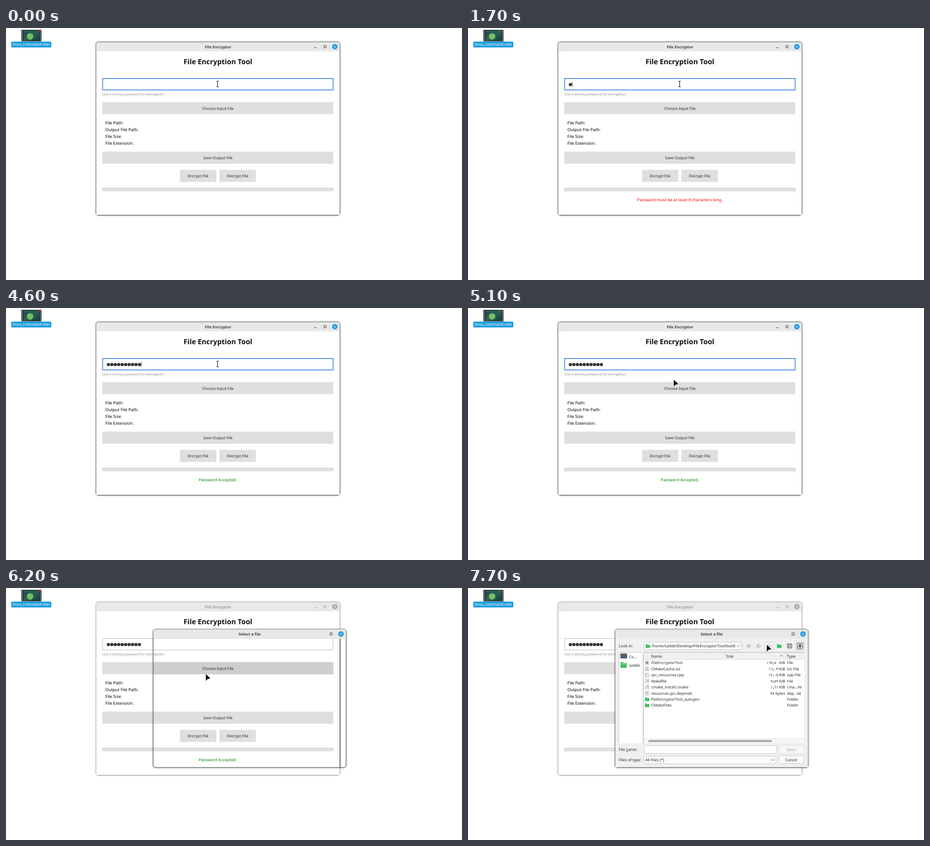
An HTML page that plays this animation: 1006x557 px, repeating every 8000 ms.

```html
<!DOCTYPE html>
<html lang="en">
<head>
<meta charset="utf-8">
<title>File Encryptor</title>
<style>
html, body { margin: 0; width: 100%; height: 100%; overflow: hidden; background: #fff; }
svg { display: block; width: 1006px; height: 557px; }
text {
  font: 8.5px "Noto Sans", "Open Sans", "DejaVu Sans", sans-serif;
  text-rendering: geometricPrecision;
  fill: #262626;
  white-space: pre;
}
.bar { color: #333; --close: #1f9ede; --title: #404040; }
.idle .bar { color: #a0a0a0; --close: #adadad; --title: #9c9c9c; }
.bar text { font-weight: 600; fill: var(--title); }
.heading { font-size: 15.6px; font-weight: 700; fill: #111; }
.hint { font-size: 7.7px; fill: #8a8a86; }
.label { font-size: 9.25px; fill: #000; }
.status { font-size: 9px; }
.white { fill: #fff; }
.dim { fill: #a9a9a9; }
</style>
</head>
<body>
<svg id="stage" viewBox="0 0 1006 557" xmlns="http://www.w3.org/2000/svg"></svg>
<script>
const GREEN = '#40bf6c';

// ---- drawing helpers ----
const text = (x, y, str, cls = '', anchor = 'start') =>
  `<text x="${x}" y="${y + 3}" class="${cls}" text-anchor="${anchor}">${str}</text>`;
const centred = (x, y, str, cls) => text(x, y, str, cls, 'middle');
const rect = (x, y, w, h, fill, stroke = 'none', rx = 0, extra = '') =>
  `<rect x="${x}" y="${y}" width="${w}" height="${h}" fill="${fill}" stroke="${stroke}" rx="${rx}" ${extra}/>`;
const line = (d, stroke, width = 1) =>
  `<path d="${d}" fill="none" stroke="${stroke}" stroke-width="${width}"/>`;
const circle = (x, y, r, fill) => `<circle cx="${x}" cy="${y}" r="${r}" fill="${fill}"/>`;
const group = (id, body, extra = '') => `<g id="${id}" ${extra}>${body}</g>`;

// Window outline with a soft shadow made of nested strokes
const frame = (x, y, w, h, strength) =>
  [[0, .8], [1, .45], [2, .2], [3, .07]].map(([grow, alpha]) =>
    rect(x - grow, y - grow, w + 2 * grow, h + 2 * grow, 'none', '#3c3c3c', 5 + grow,
      `stroke-opacity="${alpha * strength}"`)).join('');

const titleBar = (x, y, w, title, minimise) => {
  const right = x + w, mid = y + 9.8;
  return `<g class="bar">
    <path d="M${x} ${y + 20}v-15q0-5 5-5h${w - 10}q5 0 5 5v15z" fill="#e8e8e8"/>
    ${centred(x + w / 2, mid + .2, title)}
    ${minimise ? line(`M${right - 56.5} ${mid + 2.3}h5.5`, 'currentColor') : ''}
    ${rect(right - 35, mid - 2.5, 5, 5, 'none', 'currentColor')}
    ${circle(right - 10.8, mid, 6.1, 'var(--close)')}
    ${line(`M${right - 13} ${mid - 2.2}l4.4 4.4m0-4.4l-4.4 4.4`, '#fff', .9)}
  </g>`;
};

const button = (x, y, w, label) =>
  rect(x, y, w, 26.7, '#dfdfdf') + centred(x + w / 2, y + 13.6, label);
const folder = (x, y, w, h) =>
  `<path d="M${x} ${y}h${w * .4}l1 1.5h${w * .6 - 1}v${h - 1.5}h${-w}z" fill="${GREEN}"/>`;
const chevron = (x, y, dir = 1) =>
  line(`M${x - 3} ${y - 1.5 * dir}l3 ${3 * dir}l3 ${-3 * dir}`, '#444', 1);
const navArrow = (x, y, angle) =>
  `<path transform="translate(${x} ${y}) rotate(${angle})" d="M-5.2 0L0-5V-2H4.8L3 0L4.8 2H0V5Z M-2.2 0H3"
    fill="none" stroke="#999" stroke-width=".9"/>`;

// ---- desktop icon ----
const holes = x => Array.from({ length: 7 }, (_, i) =>
  rect(x, 5.2 + i * 3.5, 1.7, 1.9, '#e8e8e8')).join('');
const desktop = `
  ${rect(34, 4, 44.5, 26, '#999', 'none', 1)}
  ${rect(34, 4, 44, 25, '#151515')}
  ${rect(38, 4.5, 36, 24, 'url(#teal)')}
  ${holes(35.2)}${holes(75.2)}
  ${circle(53.2, 18.6, 7.2, '#75bd60')}
  ${circle(71.6, 6.3, 1.7, '#b93441')}
  ${line('M39 8h12', '#7fa5a0', .7)}
  ${rect(11.7, 30, 88.3, 13, '#1f9ede', 'none', 2)}
  ${centred(56, 36.4, 'linux_command.mkv', 'white')}`;

// ---- main window ----
const labels = ['File Path:', 'Output File Path:', 'File Size:', 'File Extension:'];
const mainWindow = group('main', `
  ${group('activeFrame', frame(199, 31.3, 537.3, 382.2, 1))}
  ${group('idleFrame', frame(199, 31.3, 537.3, 382.2, .55))}
  ${rect(199.5, 36, 536.5, 377, '#fff')}
  ${titleBar(199.3, 31.5, 537, 'File Encryptor', true)}
  ${centred(467.5, 76.7, 'File Encryption Tool', 'heading')}
  <rect id="field" x="213.2" y="111.6" width="508.4" height="25.3" fill="#fff"/>
  <g id="dots">${Array.from({ length: 10 }, (_, i) => circle(225.9 + 7.6 * i, 125, 3.6, '#333')).join('')}</g>
  <rect id="caret" y="118.6" width=".9" height="11.4" fill="#333"/>
  ${text(212.6, 145.5, 'Use a strong password for encryption.', 'hint')}
  ${rect(212.6, 163.9, 509.5, 26.7, '#dfdfdf')}
  <rect id="hover" y="163.9" height="26.7" fill="#cecece"/>
  ${centred(467.4, 177.5, 'Choose Input File')}
  ${labels.map((s, i) => text(219.3, 210.4 + 14.75 * i, s, 'label')).join('')}
  ${button(212.6, 273.3, 509.5, 'Save Output File')}
  ${button(383.8, 313.5, 80.2, 'Encrypt File')}
  ${button(470.9, 313.5, 80.2, 'Decrypt File')}
  ${rect(212.6, 353.6, 509.5, 6.6, '#e3e3e3')}
  ${line('M212.6 354h509.5M212.6 359.8h509.5M213 354v6M721.7 354v6', '#b8b8b8', .8)}
  ${group('short', centred(467.4, 380.2, 'Password must be at least 8 characters long.', 'status'), 'style="--c:#f00000"')}
  ${group('accepted', centred(467.4, 380.2, 'Password Accepted.', 'status'), 'style="--c:#078007"')}
`);

// ---- file dialog ----
const files = [
  ['FileEncryptorTool', '١٦٧٫٨٠ KiB', 'File', 'gear'],
  ['CMakeCache.txt', '١٦٫٠٣ KiB', 'txt File', 'lines'],
  ['qrc_resources.cpp', '١٢٫٠٥ KiB', 'cpp File', 'code'],
  ['Makefile', '٩٫٧٩ KiB', 'File', 'tool'],
  ['cmake_install.cmake', '١٫٦١ KiB', 'cma…ile', 'tool'],
  ['resources.qrc.depends', '٩٧ bytes', 'dep…ile', 'lines'],
  ['FileEncryptorTool_autogen', '', 'Folder', 'folder'],
  ['CMakeFiles', '', 'Folder', 'folder'],
];
const marks = {
  gear: circle(4, 4.5, 2.4, '#3f4f63') + circle(4, 4.5, .8, '#fff'),
  lines: line('M2 2.5h4M2 4.5h4M2 6.5h4', '#777', .8),
  code: line('M4.5 2.5h-2v5', '#58a845', 1) + line('M5 5.5l1 1', '#444', 1),
  tool: line('M2 7l4-4M4 2.8h2.2v2', '#45566b', .9),
};
const fileIcon = (kind, y) => kind === 'folder'
  ? folder(390.5, y - 4.2, 9.5, 8.2)
  : `<g transform="translate(391 ${y - 4.6})">${rect(.4, .4, 7.4, 8.6, '#fdfdfd', '#969696', .6, 'stroke-width=".8"')}${marks[kind]}</g>`;
const fileRow = ([name, size, type, kind], i) => {
  const y = 165.4 + 13.42 * i;
  return fileIcon(kind, y) + text(404.2, y, name) + text(699.5, y, size, '', 'end') + text(703.8, y, type);
};
const LINE = '#c3c3c3';
const gridDots = [707.5, 711.5].flatMap(x => [126, 130].map(y => rect(x - 1.1, y - 1.1, 2.2, 2.2, '#333'))).join('');

const dialogBody = group('dialogBody', `
  ${rect(325.4, 111, 424.2, 285, '#f0f0f0')}
  ${text(332.8, 128.3, 'Look in:')}
  ${rect(388.5, 120, 215, 16.5, '#fbfbfb', LINE, 2)}
  ${folder(392, 124.2, 9.7, 8.2)}
  ${text(404.4, 128.3, '/home/sadeb/Desktop/FileEncryptorTool/build')}
  ${chevron(596.7, 128.2)}
  ${navArrow(618.8, 128, 0)}${navArrow(641.2, 128, 180)}
  ${group('upHover', rect(655.6, 119.9, 16.8, 16.8, '#fafafa', '#cacaca', 2))}
  ${navArrow(663.6, 128, 90)}
  ${folder(681.7, 124, 10, 8.6)}
  ${rect(704.6, 123.3, 9.8, 9.6, 'none', '#333', 1)}${gridDots}
  ${rect(724, 119.8, 17, 17, '#d6d6d6', '#b4b4b4', 2)}
  ${rect(727.4, 123.2, 10, 9.8, '#f6f6f6', '#333', 1)}
  ${rect(730.2, 125.2, 4.5, 5.8, '#444')}

  ${rect(333, 142.3, 50, 200.7, '#fff')}${line('M383 142.3h-50v200.7', LINE)}
  ${rect(336.4, 145.2, 14.2, 10, '#566173', '#384353', 1, 'stroke-width=".8"')}
  ${line('M340.5 157.5h6', '#ddd', 1)}
  ${text(355.2, 152.2, 'Co…')}
  ${folder(336.3, 164, 14, 12.5)}${line('M338 167.4h10.5', '#e1f5e7', 1)}
  ${text(355.2, 170.6, 'sadeb')}

  ${rect(387.5, 142.3, 354.5, 200.7, '#fff')}
  ${rect(387.5, 142.3, 354.5, 16, '#f0f0f0')}
  ${line('M742 142.3h-354.5v200.7', '#b0b0b0')}
  ${line('M567.4 143v15M701.3 143v15M388 158.2h354', '#d2d2d2', .8)}
  ${text(404, 150.8, 'Name')}${text(570, 150.8, 'Size')}${text(703.8, 150.8, 'Type')}
  ${chevron(691.7, 149.6, -1)}
  ${files.map(fileRow).join('')}
  ${rect(388, 333.3, 354, 9.7, '#f7f7f7')}${line('M388 333.4h354', '#d6d6d6', .8)}
  ${rect(397.6, 336, 273, 4.4, '#a8a8a8', 'none', 2.2)}

  ${text(332.8, 357.2, 'File <tspan text-decoration="underline">n</tspan>ame:')}
  ${rect(388.3, 348.3, 292, 17.6, '#fff', LINE, 2)}
  <rect id="nameCaret" x="390.4" y="351.5" width=".9" height="11.3" fill="#333"/>
  ${rect(685.7, 348, 55, 17.8, '#f7f7f7', '#d9d9d9', 2)}${centred(713, 357, 'Open', 'dim')}
  ${text(332.8, 380, 'Files of type:')}
  ${rect(388.3, 371.8, 291, 16.5, '#fbfbfb', LINE, 2)}${text(391, 380, 'All Files (*)')}
  ${line('M667 372.3v15.6', '#dcdcdc', .8)}${chevron(672.4, 380)}
  ${rect(685.7, 370.7, 55, 17.6, '#fbfbfb', LINE, 2)}${centred(713, 379.6, 'Cancel')}
`);
const dialog = group('dialog', `
  ${group('ghost', frame(199, 31.3, 537.3, 382.2, 1), 'clip-path="url(#inside)"')}
  ${frame(325, 92, 425, 304.4, 1)}
  ${titleBar(325.3, 91.8, 424.5, 'Select a file', false)}
  ${dialogBody}
`);

// ---- pointers ----
const BEAM = 'M-2.6-6.2h1.6q1 0 1 1V5.2q0 1-1 1h-1.6M2.6-6.2h-1.6q-1 0-1 1V5.2q0 1 1 1h1.6';
const pointers =
  group('beam', line(BEAM, '#fff', 2.4) + line(BEAM, '#111', 1.2), 'transform="translate(466.8 123.8)"') +
  group('arrow', '<path d="M0 0V15L4.2 10.8L10 9.8Z" fill="#000" stroke="#fff" stroke-width="1" stroke-linejoin="round" paint-order="stroke"/>');

const stage = document.getElementById('stage');
stage.innerHTML = `<defs>
  <linearGradient id="teal" x2="1" y2="1"><stop stop-color="#19413f"/><stop offset=".5" stop-color="#28605b"/><stop offset="1" stop-color="#163c3e"/></linearGradient>
  <clipPath id="inside"><rect x="325" y="111" width="424" height="285"/></clipPath>
</defs>` + desktop + mainWindow + dialog + pointers;

// ---- timeline: each step changes only what it names ----
const LOOP = 8000;
const steps = [
  [0, { dots: 0, caret: false, focus: true, status: '', hoverX: 0, arrow: null, dialog: '', nameCaret: false, upHover: false }],
  [900, { caret: true }],
  [1100, { caret: false }],
  [1600, { caret: true }],
  [1700, { dots: 1, status: 'short' }],
  [1900, { dots: 2 }],
  [2100, { dots: 3 }],
  [2200, { dots: 4 }],
  [2300, { dots: 5 }],
  [2900, { dots: 6 }],
  [4600, { dots: 10, status: 'accepted' }],
  [5100, { caret: false, arrow: [454, 158.5] }],
  [5600, { focus: false, hoverX: 212.6, arrow: [443.2, 183.8] }],
  [6200, { dialog: 'empty', hoverX: 325, arrow: [440.8, 190.2] }],
  [6700, { dialog: 'full', hoverX: 0 }],
  [7200, { arrow: [511.5, 146.5], nameCaret: true }],
  [7700, { arrow: [659.3, 125.4], nameCaret: false, upHover: true }],
];

const el = id => document.getElementById(id);
const show = (id, on) => { el(id).style.display = on ? '' : 'none'; };
const set = (id, attrs) => Object.entries(attrs).forEach(([k, v]) => el(id).setAttribute(k, v));
for (const id of ['short', 'accepted']) el(id).firstElementChild.style.fill = 'var(--c)';

function render(s) {
  [...el('dots').children].forEach((dot, i) => { dot.style.display = i < s.dots ? '' : 'none'; });
  show('caret', s.caret);
  set('caret', { x: 222.1 + 7.6 * s.dots });
  set('field', s.focus ? { stroke: '#1264e3', 'stroke-width': 1.4 } : { stroke: '#b9b9b9', 'stroke-width': 1 });
  show('short', s.status === 'short');
  show('accepted', s.status === 'accepted');
  show('hover', s.hoverX);
  set('hover', { x: s.hoverX, width: 722.1 - s.hoverX });
  el('main').classList.toggle('idle', !!s.dialog);
  show('activeFrame', !s.dialog);
  show('idleFrame', s.dialog);
  show('dialog', s.dialog);
  show('ghost', s.dialog === 'empty');
  show('dialogBody', s.dialog === 'full');
  show('nameCaret', s.nameCaret);
  show('upHover', s.upHover);
  show('beam', !s.arrow);
  show('arrow', s.arrow);
  if (s.arrow) set('arrow', { transform: `translate(${s.arrow})` });
}

const start = performance.now();
let shown = -1;
function tick() {
  const time = (performance.now() - start) % LOOP;
  const index = steps.filter(([at]) => at <= time).length - 1;
  if (index !== shown) {
    render(Object.assign({}, ...steps.slice(0, index + 1).map(step => step[1])));
    shown = index;
  }
  requestAnimationFrame(tick);
}
tick();
</script>
</body>
</html>
```
